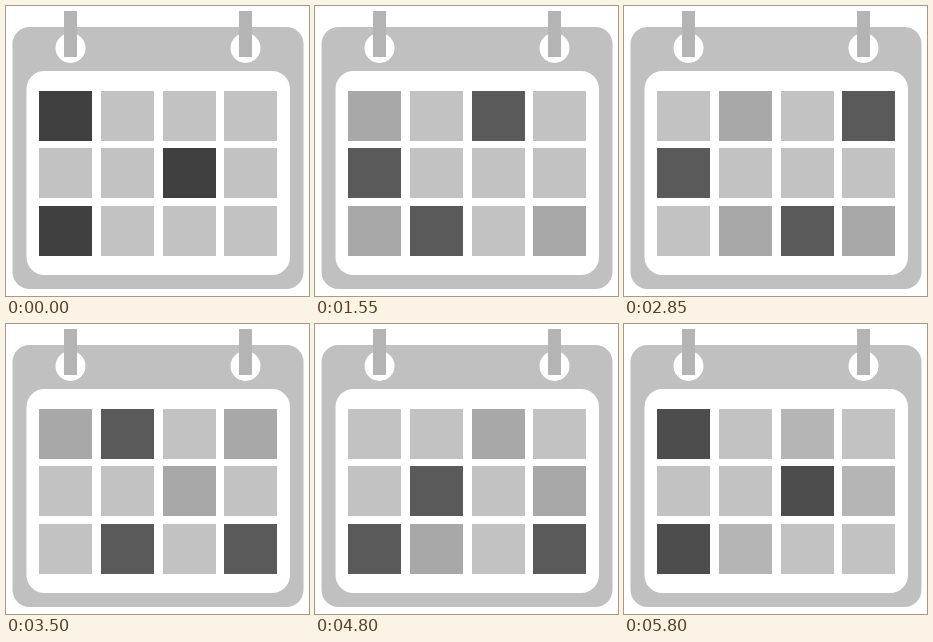
Animation, 303 px wide and 290 px high, one loop 5.85 s. Source, as an HTML page:

```html
<!DOCTYPE html>
<html lang="en">
<head>
<meta charset="utf-8">
<title>Calendar</title>
<style>
  html, body { margin: 0; width: 100%; height: 100%; overflow: hidden; background: #fff; }
  svg { display: block; width: 303px; height: 290px; }
</style>
</head>
<body>
<svg viewBox="0 0 303 290">
  <rect x="6.5" y="21" width="291" height="262" rx="17" fill="#c0c0c0"/>
  <rect x="20.5" y="65" width="263.5" height="204" rx="18" fill="#fff"/>
  <g fill="#fff"><circle cx="64.5" cy="42" r="15"/><circle cx="239.5" cy="42" r="15"/></g>
  <g fill="#b4b4b4"><rect x="58" y="5" width="13" height="46"/><rect x="233" y="5" width="13" height="46"/></g>
  <g id="days"></g>
</svg>
<script>
const LIGHT = 194, DARK = 64;
const PERIOD = 650, TICK = 50, HOLD_TICKS = 3;
// Progress of a cross-fade on each tick after the hold
const FADE = [0, .1, .2, .2, .4, .4, .6, .6, .8, .9];
// Marked days per state, counted row by row
const STATES = [
  [0, 6, 8], [3, 5, 11], [2, 4, 9],
  [0, 8, 11], [3, 4, 10], [1, 9, 11],
  [0, 3, 6], [5, 8, 11], [2, 7, 9]
];

const days = [85, 142, 200].flatMap(y => [33, 95, 157, 218].map(x => {
  const day = document.createElementNS('http://www.w3.org/2000/svg', 'rect');
  const box = { x, y, width: 53, height: 50 };
  for (const key in box) day.setAttribute(key, box[key]);
  return document.getElementById('days').appendChild(day);
}));

function draw() {
  const time = performance.now() % (PERIOD * STATES.length);
  const index = Math.floor(time / PERIOD);
  const tick = Math.floor(time % PERIOD / TICK);
  const progress = FADE[Math.max(0, tick - HOLD_TICKS)];
  const from = STATES[index], to = STATES[(index + 1) % STATES.length];

  days.forEach((day, i) => {
    const mark = from.includes(i) * (1 - progress) + to.includes(i) * progress;
    const grey = Math.round(LIGHT + (DARK - LIGHT) * mark);
    day.setAttribute('fill', `rgb(${grey},${grey},${grey})`);
  });
  requestAnimationFrame(draw);
}
draw();
</script>
</body>
</html>
```
